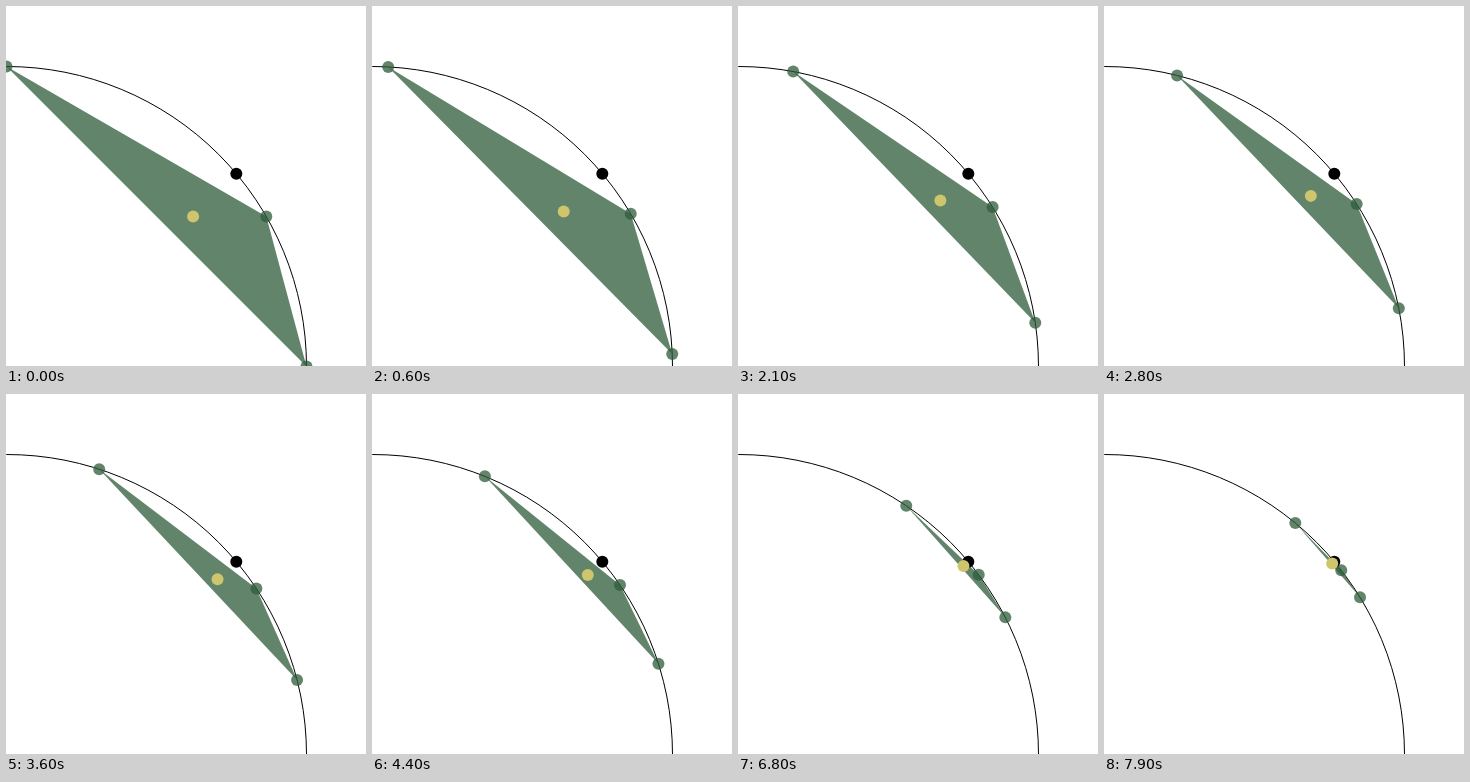
An HTML page for the animation above (8 s loop, 360 px wide and 360 px high).

```html
<!DOCTYPE html>
<html lang="en">
<head>
<meta charset="utf-8">
<title>Triangle shrinking to a point on a circle</title>
<style>
  html, body { margin: 0; width: 100%; height: 100%; overflow: hidden; background: #fff; }
  svg { display: block; width: 360px; height: 360px; }
  .arc { fill: none; stroke: #000; stroke-width: 1; }
  .green { fill: #2d5b3a; fill-opacity: .75; }
  .center { fill: #cec56c; }
</style>
</head>
<body>
<svg viewBox="0 0 360 360">
  <g transform="translate(.5 .5)">
    <circle class="arc" cx="0" cy="360" r="300"/>
    <polygon id="triangle" class="green"/>
    <circle class="corner green" r="6"/>
    <circle class="corner green" r="6"/>
    <circle class="corner green" r="6"/>
    <circle id="limit" r="6"/>
    <circle id="centroid" class="center" r="6"/>
  </g>
</svg>
<script>
  const LOOP = 8000, STEP = 100, TRAVEL = 10000;
  const RADIUS = 300, LIMIT = 40, STARTS = [90, 30, 0];

  const triangle = document.getElementById('triangle');
  const corners = document.querySelectorAll('.corner');
  const centroid = document.getElementById('centroid');

  function onCircle(degrees) {
    const a = degrees * Math.PI / 180;
    return [RADIUS * Math.cos(a), 360 - RADIUS * Math.sin(a)];
  }

  function place(dot, [x, y]) {
    dot.setAttribute('cx', x);
    dot.setAttribute('cy', y);
  }

  function draw(time) {
    const progress = Math.floor(time / STEP) * STEP / TRAVEL;
    const points = STARTS.map(s => onCircle(s + (LIMIT - s) * progress));
    triangle.setAttribute('points', points.join(' '));
    points.forEach((p, i) => place(corners[i], p));
    place(centroid, [0, 1].map(k => points.reduce((sum, p) => sum + p[k], 0) / 3));
  }

  place(document.getElementById('limit'), onCircle(LIMIT));
  draw(0);

  const start = performance.now();
  function tick() {
    draw((performance.now() - start) % LOOP);
    requestAnimationFrame(tick);
  }
  requestAnimationFrame(tick);
</script>
</body>
</html>
```
